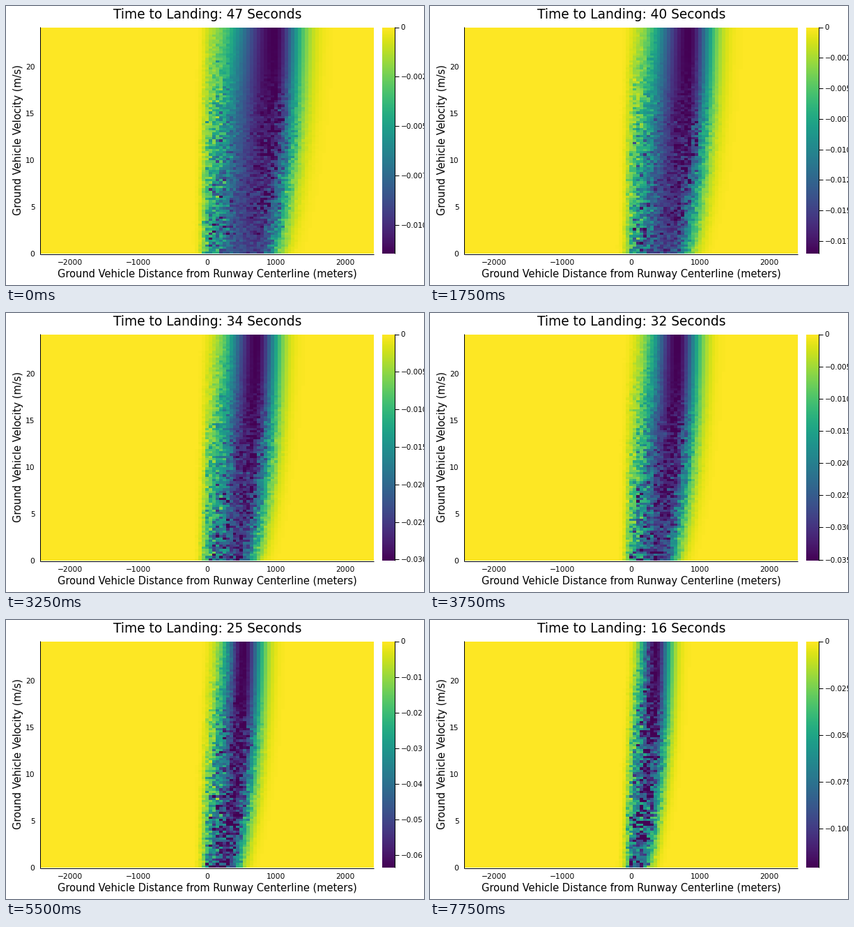
A matplotlib script for the animation above (8000 ms loop, 600 by 400 pixels).

```python
import numpy as np
import matplotlib.pyplot as plt
from matplotlib.animation import FuncAnimation

plt.rcParams["font.family"] = "DejaVu Sans"

W, H, DPI = 600, 400, 100
FRAMES, INTERVAL = 32, 250
LEFT, RIGHT, TOP, BOTTOM = 49, 528, 31, 355
BAR_L, BAR_R = 540, 558
ZERO_X = 289
N = 97
FIRST_SECOND = 47

# Deepest value of the colour scale: seconds to landing -> depth
SCALE = {16: 0.1207, 28: 0.0511, 32: 0.0351, 37: 0.0239, 43: 0.01433, 47: 0.01144}

cell_x = LEFT + (np.arange(N) + 0.5) * (RIGHT - LEFT) / N
speed = np.linspace(0, 1, N)[:, None]  # share of the top speed, one row each


def px(size):
    return size * 72 / DPI


def bell(x, centre, width):
    return np.exp(-0.5 * ((x - centre) / width) ** 2)


def sigmoid(x):
    return 1 / (1 + np.exp(-x))


def field(seconds):
    """Normalised depth: a lopsided trough that narrows and drifts left."""
    slow = 1 - speed
    peak = 291.5 + 2 * seconds - 25 * slow ** 2
    wide_left = (10 + 0.0155 * seconds ** 2) * (1 + 0.6 * slow)
    wide_right = (9 + 0.33 * seconds) * (0.8 + 0.25 * np.sqrt(speed))
    width = np.where(cell_x < peak, wide_left, wide_right)
    shore = sigmoid((cell_x - ZERO_X + 5) / 3.5)
    depth = (1 - 0.18 * slow ** 2) * bell(cell_x, peak, width) * shore

    # Sampling noise lives on both flanks and fades at high speed
    calm = sigmoid((0.66 - speed) * 16)
    left = bell(cell_x, ZERO_X + 8, 16) * (1 - 0.8 * speed ** 4)
    right = bell(cell_x, peak + 1.2 * wide_right, wide_right)
    sigma = 0.36 * left + (0.15 * right + 0.035) * calm
    noise = np.random.default_rng(seconds).standard_normal((N, N))
    return depth * np.exp(sigma * noise - sigma ** 2 / 2)


def scale_ticks(depth):
    """Tick step and decimals of the colour scale."""
    for limit, step, digits in ((0.025, 0.0025, 4), (0.05, 0.005, 3),
                                (0.1, 0.01, 2)):
        if depth < limit:
            return step, digits
    return 0.025, 3


fig = plt.figure(figsize=(W / DPI, H / DPI), dpi=DPI, facecolor="white")
ax = fig.add_axes([0, 0, 1, 1])


def label(x, y, text, size, ha="center", **kw):
    return ax.text(x, y, text, fontsize=px(size), ha=ha, va="baseline", **kw)


def line(xs, ys):
    return ax.plot(xs, ys, color="black", lw=px(1), solid_capstyle="butt")[0]


def image(data, left, right, **kw):
    return ax.imshow(data, cmap="viridis_r", vmin=0, vmax=1,
                     extent=(left, right, BOTTOM, TOP),
                     interpolation="nearest", aspect="auto", **kw)


heat = image(np.zeros((N, N)), LEFT, RIGHT, origin="lower")
image(np.linspace(0, 1, 256)[:, None], BAR_L, BAR_R, origin="upper")
ax.set(xlim=(0, W), ylim=(H, 0))
ax.axis("off")

# Whole coordinates snap to the pixel right of and above them
line([LEFT, LEFT], [TOP - 1, BOTTOM + 1])
line([LEFT, RIGHT], [BOTTOM + 1] * 2)
line([BAR_R, BAR_R], [TOP - 1, BOTTOM])

for metres in range(-2000, 2001, 1000):
    label(ZERO_X + metres * 0.0987, 371, str(metres).replace("-", "\u2212"), 10.67)
for mps in range(0, 21, 5):
    label(41.5, 358.7 - 13.4 * mps, str(mps), 10.67, ha="right")

label(ZERO_X, 389, "Ground Vehicle Distance from Runway Centerline (meters)", 14.67)
label(22, 192.5, "Ground Vehicle Velocity (m/s)", 14.67,
      rotation=90, rotation_mode="anchor")
title = label(ZERO_X, 18, "", 18.67)
marks = []


def draw(i):
    seconds = FIRST_SECOND - i
    title.set_text(f"Time to Landing: {seconds} Seconds")
    heat.set_data(field(seconds))

    while marks:
        marks.pop().remove()
    depth = np.exp(np.interp(seconds, list(SCALE), np.log(list(SCALE.values()))))
    step, digits = scale_ticks(depth)
    for k in range(int(depth / step) + 1):
        y = TOP - 0.5 + k * step / depth * (BOTTOM - TOP)
        text = f"\u2212{k * step:.{digits}f}" if k else "0"
        marks.append(line([BAR_R, BAR_R + 6], [y, y]))
        marks.append(label(566.5, y + 4, text, 10.4, ha="left", clip_on=True))
    return [heat, title, *marks]


anim = FuncAnimation(fig, draw, frames=FRAMES, interval=INTERVAL,
                     repeat=True, repeat_delay=0, blit=False)
plt.show()
```
